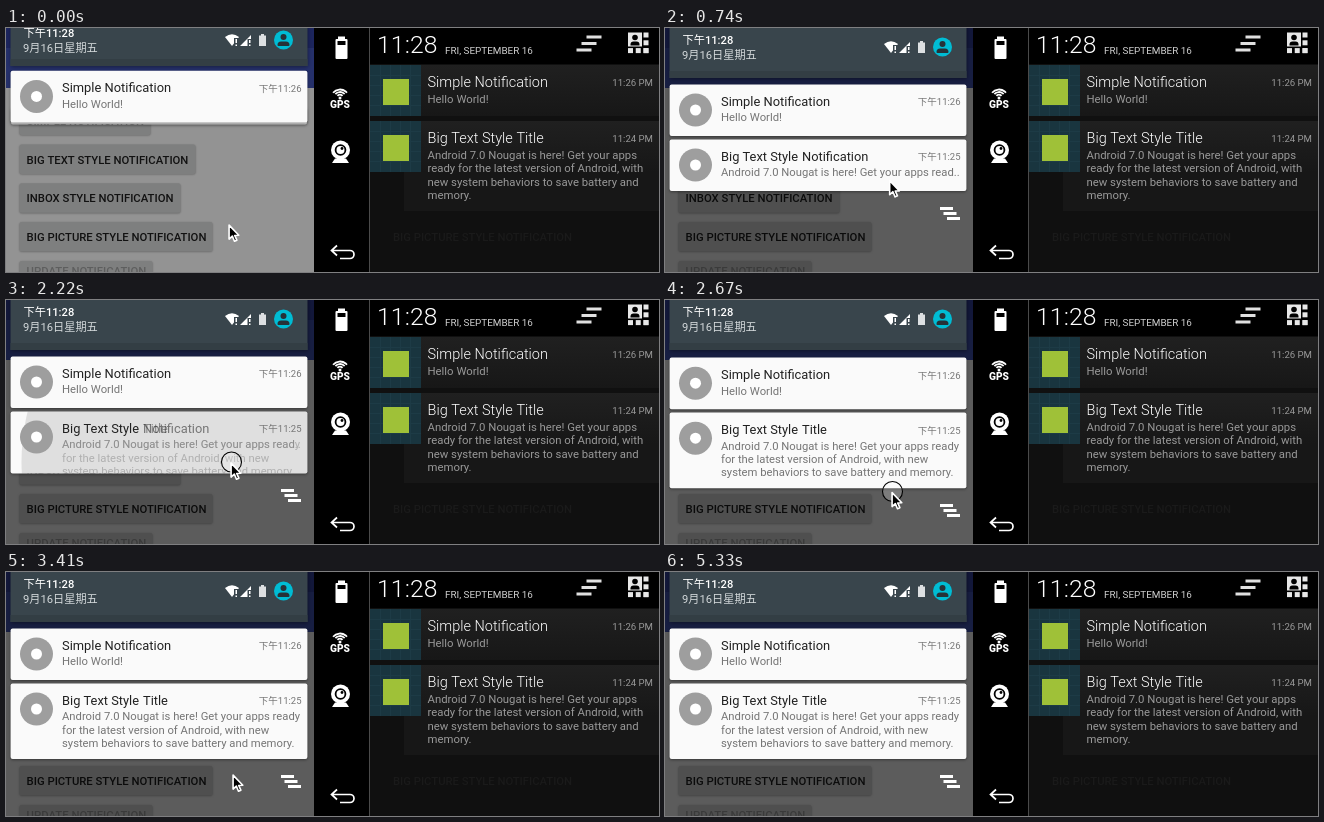
An HTML page with a canvas that plays this animation: 653 px wide and 244 px high, repeating every 6.53 s.

```html
<!DOCTYPE html>
<html lang="en">
<head>
<meta charset="utf-8">
<title>Notification shade</title>
<style>
html, body { margin: 0; width: 100%; height: 100%; overflow: hidden; background: #000; }
canvas { display: block; }
</style>
</head>
<body>
<canvas id="stage" width="653" height="244"></canvas>
<script>
const ctx = document.getElementById('stage').getContext('2d');
const LOOP = 6530, TICK = 148.4;
const SANS = 'Roboto, "Noto Sans CJK SC", "Noto Sans CJK", sans-serif';
const LEADING = 13.4;
const BODY = [
  'Android 7.0 Nougat is here! Get your apps ready',
  'for the latest version of Android, with new',
  'system behaviors to save battery and memory.'
];

// Pointer path: tick, x, y
const PATH = [
  [0, 223.5, 196], [1, 223.5, 196], [6, 225.5, 140.5], [12, 225.5, 140.5],
  [13, 225.5, 143.5], [15, 225.5, 162], [18, 227.5, 191.5], [20, 227.5, 202],
  [27, 227.5, 202], [29, 232.5, 207], [30, 232.5, 207], [33, 232.5, 182.5],
  [34, 232.5, 182.5], [35, 272, 217]
];

const clamp = v => Math.max(0, Math.min(1, v));
const ramp = (v, a, b) => clamp((v - a) / (b - a));

function rect(x, y, w, h, color) {
  ctx.fillStyle = color;
  ctx.fillRect(x, y, w, h);
}

function round(x, y, w, h, r, color) {
  ctx.fillStyle = color;
  ctx.beginPath();
  ctx.roundRect(x, y, w, h, r);
  ctx.fill();
}

function disc(x, y, r, color) {
  ctx.fillStyle = color;
  ctx.beginPath();
  ctx.arc(x, y, r, 0, Math.PI * 2);
  ctx.fill();
}

function poly(points, color) {
  ctx.fillStyle = color;
  ctx.beginPath();
  for (let i = 0; i < points.length; i += 2) ctx.lineTo(points[i], points[i + 1]);
  ctx.closePath();
  ctx.fill();
}

function text(str, x, y, size, color, weight = 400, align = 'left') {
  ctx.font = `${weight} ${size}px ${SANS}`;
  ctx.textAlign = align;
  ctx.fillStyle = color;
  ctx.fillText(str, x, Math.round(y));
}

function shadow(blur, dy, draw, alpha = 0.4) {
  ctx.save();
  ctx.shadowColor = `rgba(0,0,0,${alpha})`;
  ctx.shadowBlur = blur;
  ctx.shadowOffsetY = dy;
  draw();
  ctx.restore();
}

function faded(alpha, draw) {
  if (alpha <= 0) return;
  ctx.save();
  ctx.globalAlpha *= alpha;
  draw();
  ctx.restore();
}

function button(label, y, w, disabled) {
  shadow(2, 0.6, () => round(13.5, y, w, 29.5, 2, '#d6d7d7'), 0.3);
  text(label, 20.6, y + (disabled ? 14 : 19), 11.3,
    disabled ? 'rgba(0,0,0,.26)' : 'rgba(0,0,0,.87)', 500);
}

function app(dim) {
  rect(0, 0, 308, 244, '#fafafa');
  rect(0, 0, 308, 20, '#303f9f');
  rect(0, 20, 308, 40, '#3f51b5');
  button('SIMPLE NOTIFICATION', 77.5, 131);
  button('BIG TEXT STYLE NOTIFICATION', 116.5, 176);
  button('INBOX STYLE NOTIFICATION', 155.3, 161);
  button('BIG PICTURE STYLE NOTIFICATION', 194, 193);
  button('UPDATE NOTIFICATION', 233, 133, true);
  rect(0, 0, 308, 244, `rgba(0,0,0,${dim})`);
}

function header(dy, bottom) {
  shadow(4, 1, () => rect(4.5, -4, 297, bottom + 4, '#39454c'));
  rect(4.5, bottom - 7, 297, 7, '#333e44');
  text('下午11:28', 17.5, 16 + dy, 11.2, '#fff', 500);
  text('9月16日星期五', 17, 31 + dy, 11.2, '#d5dadc');
  ctx.save();
  ctx.translate(0, dy);
  // wifi, signal, battery, account
  ctx.fillStyle = '#fff';
  ctx.beginPath();
  ctx.moveTo(226, 25);
  ctx.lineTo(219, 16);
  ctx.quadraticCurveTo(226, 10.5, 233, 16);
  ctx.fill();
  rect(228, 17, 5, 9, '#39454c');
  rect(229.5, 18, 1.5, 4, '#fff');
  rect(229.5, 23.5, 1.5, 1.5, '#fff');
  poly([234, 25, 245, 14, 245, 18, 241.5, 18, 241.5, 25], '#fff');
  rect(243, 19, 1.5, 3, '#fff');
  rect(243, 23.5, 1.5, 1.5, '#fff');
  rect(253, 14.5, 7, 10.5, '#dde0e2');
  rect(255, 13, 3, 2, '#dde0e2');
  disc(277.5, 19, 9.5, '#00bcd4');
  disc(277.5, 16, 3, '#263238');
  round(271.5, 20.5, 12, 4.5, [4, 4, 1, 1], '#263238');
  ctx.restore();
}

function card(y, h, time, content, ripple) {
  shadow(3, 1, () => round(4.6, y + 0.4, 296.8, h - 0.4, 2, '#fafafa'));
  ctx.save();
  ctx.beginPath();
  ctx.roundRect(4.6, y + 0.4, 296.8, h - 0.4, 2);
  ctx.clip();
  if (ripple) ripple();
  disc(30.5, y + 26, 16.5, '#9e9e9e');
  disc(30.5, y + 26, 5.5, '#fff');
  content();
  text(time, 295.5, y + 21.4, 9.5, '#757575', 400, 'right');
  ctx.restore();
}

function simpleCard(y) {
  card(y, 52, '下午11:26', () => {
    text('Simple Notification', 56, y + 22, 12.9, '#212121');
    text('Hello World!', 56, y + 37.4, 11.3, '#757575');
  });
}

function bigCard(y, open, k, finger) {
  const mix = ramp(open, 0.15, 0.8);
  card(y, 52 + 24 * open, '下午11:25', () => {
    text('Big Text Style', 56, y + 22, 12.85, '#212121');
    faded(1 - mix, () => {
      text('Notification', 137, y + 22, 12.85, '#212121');
      text('Android 7.0 Nougat is here! Get your apps read..', 56, y + 37.4, 11.25, '#757575');
    });
    faded(mix, () => {
      text('Title', 137, y + 22, 12.85, '#212121');
      BODY.forEach((line, i) => text(line, 56, y + 37.4 + i * LEADING, 11.25, '#757575'));
    });
  }, () => {
    const tint = 0.11 * ramp(k, 11, 14) * (1 - ramp(k, 15, 18));
    if (tint > 0) disc(finger.x, finger.y, 210 * ramp(k, 11, 15), `rgba(0,0,0,${tint})`);
  });
}

function bars(x, y, w, dx, step, thick, color) {
  for (let i = 0; i < 3; i++) rect(x + i * dx, y + i * step, w, thick, color);
}

function pointerAt(k) {
  let i = 0;
  while (i < PATH.length - 2 && k >= PATH[i + 1][0]) i++;
  const [a, ax, ay] = PATH[i], [b, bx, by] = PATH[i + 1];
  const p = ramp(k, a, b);
  return { x: ax + (bx - ax) * p, y: ay + (by - ay) * p };
}

function pointer({ x, y }, pressed) {
  if (pressed) {
    disc(x, y, 10, 'rgba(255,255,255,.2)');
    ctx.strokeStyle = '#000';
    ctx.lineWidth = 1.1;
    ctx.beginPath();
    ctx.arc(x, y, 10, 0, Math.PI * 2);
    ctx.stroke();
  }
  ctx.save();
  ctx.translate(x - 1.5, y);
  ctx.scale(1.08, 1.08);
  ctx.lineJoin = 'round';
  ctx.strokeStyle = '#fff';
  ctx.lineWidth = 1.5;
  poly([1, 1, 1, 14, 4, 11.2, 6, 16, 8.2, 15, 6.2, 10.6, 10, 10.4], '#000');
  ctx.stroke();
  ctx.restore();
}

function phone(k) {
  const start = k === 0;
  const open = ramp(k, 12.67, 18);
  const pull = 1.2 * ramp(k, 17, 18) * (1 - ramp(k, 21, 23));
  const finger = pointerAt(k);
  ctx.save();
  ctx.beginPath();
  ctx.rect(0, 0, 308, 244);
  ctx.clip();
  app(start ? 0.41 : 0.62 + 0.01 * ramp(k, 1, 4));
  header(start ? -7 : 0, start ? 38 : 50);
  if (start) {
    shadow(3, 1, () => round(5, 80, 296, 16.5, 2, '#d8d8d8'));
    simpleCard(42.4);
  } else {
    const y = 111 + pull;
    simpleCard(56 + pull);
    bigCard(y, open, k, finger);
    faded(ramp(k, 1, 5), () =>
      bars(275, Math.round(y + 68 + 24 * open), 13, 3.5, 5, 3, '#fff'));
  }
  if (k < 36) pointer(finger, (k >= 11 && k < 22) || (k >= 33 && k < 35));
  ctx.restore();
}

function arc(x, y, r) {
  ctx.beginPath();
  ctx.arc(x, y, r, -Math.PI * 0.78, -Math.PI * 0.22);
  ctx.stroke();
}

function toolbar() {
  rect(308, 0, 55, 244, '#000');
  rect(363, 0, 1, 244, '#4a4a4a');
  // battery
  round(329.5, 11, 12, 20, 1, '#fff');
  rect(332, 8.5, 7, 3, '#fff');
  rect(331.5, 13, 8, 4, '#000');
  // location
  ctx.strokeStyle = '#fff';
  ctx.lineWidth = 1.8;
  arc(334, 70, 3.3);
  arc(334, 70, 6);
  arc(334, 70.5, 9);
  disc(334, 70, 1.5, '#fff');
  text('GPS', 334, 80, 10.2, '#fff', 900, 'center');
  // camera
  disc(334.5, 122, 9.5, '#fff');
  disc(334.5, 122, 5.8, '#000');
  disc(334.5, 122, 4, '#fff');
  disc(336, 120.5, 1.4, '#000');
  poly([329, 130.5, 340, 130.5, 343, 135, 326, 135], '#fff');
  // back
  ctx.lineWidth = 1.7;
  ctx.beginPath();
  ctx.moveTo(331, 217.5);
  ctx.lineTo(325.5, 222.5);
  ctx.lineTo(331, 227.5);
  ctx.moveTo(325.5, 222.5);
  ctx.lineTo(344, 222.5);
  ctx.arc(344, 226.5, 4, -Math.PI / 2, Math.PI / 2);
  ctx.lineTo(334, 230.5);
  ctx.stroke();
}

function darkRow(y, title, time, lines) {
  const bg = ctx.createLinearGradient(0, y, 0, y + 51);
  bg.addColorStop(0, '#202020');
  bg.addColorStop(1, '#171717');
  rect(364, y, 289, 51, bg);
  rect(364, y, 51, 51, '#19353f');
  for (let i = 1; i < 5; i++) {
    rect(364 + i * 10, y, 1, 51, '#1d3b46');
    rect(364, y + i * 10, 51, 1, '#1d3b46');
  }
  rect(377, y + 14, 26, 26, '#9fc138');
  text(title, 421.5, y + 22, 14.5, '#fff', 300);
  text(time, 647, y + 21, 9.6, '#999', 400, 'right');
  lines.forEach((line, i) => text(line, 421.5, y + 38 + i * LEADING, 11.35, '#999'));
}

function accountTile(x, y) {
  rect(x, y, 14, 14, '#e8e8e8');
  disc(x + 7, y + 5, 2.8, '#000');
  round(x + 2.5, y + 9, 9, 4, [3, 3, 0, 0], '#000');
  for (let i = 0; i < 3; i++) {
    rect(x + 15.5, y + i * 7.8, 5, 5, '#e8e8e8');
    rect(x + i * 7.75, y + 15.6, 5, 5, '#e8e8e8');
  }
}

function darkShade() {
  rect(364, 0, 289, 244, '#101010');
  rect(364, 0, 289, 36, '#000');
  rect(398, 144, 255, 39, '#171717');
  text('BIG PICTURE STYLE NOTIFICATION', 387, 213, 11.25, '#1a1a1a', 500);
  text('11', 371, 25, 24.7, '#fff', 300);
  text(':28', 398.8, 25, 24.7, '#fff', 300);
  text('FRI, SEPTEMBER 16', 439, 26, 9.9, '#d0d0d0');
  bars(580.5, 7.5, 15, -5, 6.5, 3, '#e0e0e0');
  accountTile(622, 4.5);
  darkRow(37, 'Simple Notification', '11:26 PM', ['Hello World!']);
  darkRow(93, 'Big Text Style Title', '11:24 PM', [
    'Android 7.0 Nougat is here! Get your apps',
    'ready for the latest version of Android, with',
    'new system behaviors to save battery and',
    'memory.'
  ]);
}

function draw(now) {
  const k = Math.floor((now % LOOP + 13) / TICK);
  phone(k % 44);
  toolbar();
  darkShade();
}

const began = performance.now();
function frame() {
  draw(performance.now() - began);
  requestAnimationFrame(frame);
}
frame();
</script>
</body>
</html>
```
